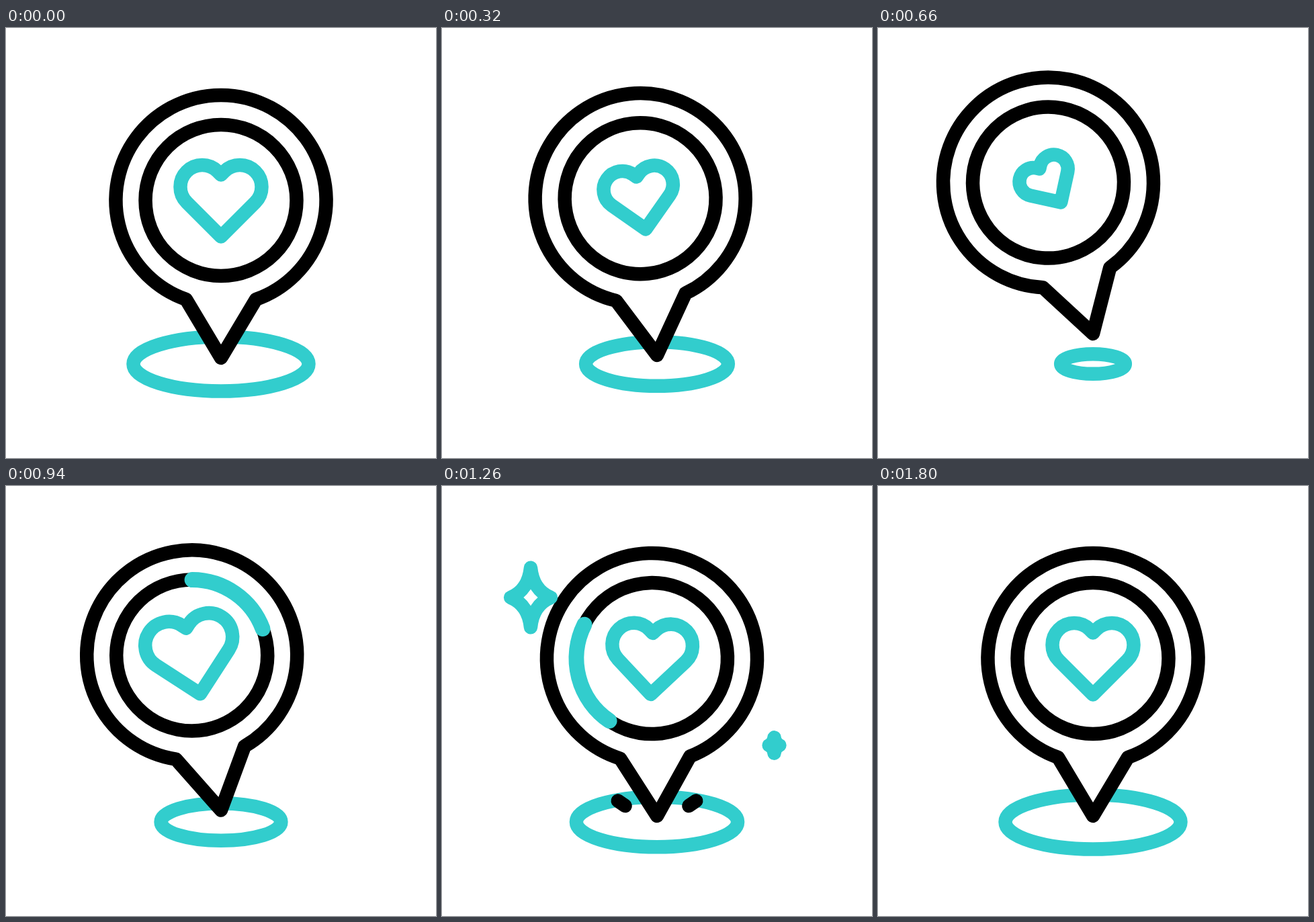
These frames come from a looping animation (640 px wide and 640 px high, 3 s). An HTML page with a canvas:

```html
<!DOCTYPE html>
<html lang="en">
<head>
<meta charset="utf-8">
<title>Map pin with heart</title>
<style>
  html, body { margin: 0; height: 100%; overflow: hidden; background: #fff; }
  canvas { display: block; }
</style>
</head>
<body>
<canvas id="stage" width="640" height="640"></canvas>
<script>
const ctx = document.getElementById('stage').getContext('2d');
const LOOP = 3000, LINE = 20.5, BLACK = '#000', TEAL = '#32cdcd';
const PIN_HEIGHT = 234.5; // from tip to centre of the head
const rad = degrees => degrees * Math.PI / 180;
const progress = (t, from, to) => Math.min(1, Math.max(0, (t - from) / (to - from)));
const smooth = u => u * u * (3 - 2 * u);

// Eased value at time t through [time, value] keys.
function track(t, keys) {
  let value = keys[0][1];
  for (let i = 1; i < keys.length; i++) {
    const u = smooth(progress(t, keys[i - 1][0], keys[i][0]));
    value += (keys[i][1] - keys[i - 1][1]) * u;
  }
  return value;
}

function stroke(path, color, width = LINE) {
  ctx.strokeStyle = color;
  ctx.lineWidth = width;
  ctx.stroke(path);
}

const pinBody = new Path2D('M0 0L-52-87A156.5 156.5 0 1 1 52-87Z');
const heart = new Path2D('M0-38L-5-43A32.5 32.5 0 0 0-51 3L0 54L51 3A32.5 32.5 0 0 0 5-43Z');
const star = new Path2D(
  'M0-52.5C2.5-28 14.5-8.5 35.5 0C14.5 8.5 2.5 28 0 52.5' +
  'C-2.5 28-14.5 8.5-35.5 0C-14.5-8.5-2.5-28 0-52.5Z');
const innerRing = new Path2D();
innerRing.arc(0, 0, 112.5, 0, 2 * Math.PI);

// Scales the outline but keeps the line width.
function strokeTransformed(path, color, matrix) {
  const scaled = new Path2D();
  scaled.addPath(path, matrix);
  stroke(scaled, color);
}

function drawShadow(t) {
  const size = 1 - track(t, [[100, 0], [720, .65], [840, .65], [1062, -.125], [1260, .08], [1500, 0]]);
  const ring = new Path2D();
  ring.ellipse(320, 500, 130.5 * size, 40.5 * size, 0, 0, 2 * Math.PI);
  stroke(ring, TEAL);
}

function drawRays(t) {
  const head = smooth(progress(t, 1150, 1350));
  const tail = smooth(progress(t, 1187, 1387));
  if (head <= tail) return;
  for (const side of [-1, 1]) {
    const ray = new Path2D();
    for (const p of [tail, head]) ray.lineTo(320 + side * (35 + 40 * p), 484.6 - 27.6 * p);
    stroke(ray, BLACK);
  }
}

function drawSweep(t) {
  const trim = (from, to) => 1 - (1 - progress(t, from, to)) ** 1.35;
  const head = trim(847, 1422), tail = trim(930, 1612);
  if (head <= tail) return;
  const arc = new Path2D();
  arc.arc(0, 0, 112.5, rad(-87 + 360 * tail), rad(-87 + 360 * head));
  stroke(arc, TEAL, 23);
}

function drawPin(t) {
  const lift = t < 670 ? 37.5 * (t / 670) ** 3 : track(t, [[840, 37.5], [986, 0]]);
  const tilt = track(t, [[0, 0], [840, -18.65], [1091, 3.9], [1280, -2], [1650, 0]]);
  const heartTurn = track(t, [[110, 0], [840, -19], [1003, 7], [1540, 0]]);
  const heartSize = track(t, [[0, 1], [780, .62], [960, 1.1], [1200, .985], [1400, 1]]);

  ctx.save();
  ctx.translate(320, 491 - lift);
  ctx.rotate(rad(tilt));
  ctx.fillStyle = '#fff';
  ctx.fill(pinBody);
  stroke(pinBody, BLACK);
  ctx.translate(0, -PIN_HEIGHT);
  stroke(innerRing, BLACK);
  drawSweep(t);
  strokeTransformed(heart, TEAL, new DOMMatrix().rotate(heartTurn).scale(heartSize));
  ctx.restore();
}

function drawSparkle(t, x, y, start) {
  const size = track(t - start, [[0, 0], [302, 1], [405, 1], [585, 0]]);
  if (size > .001) strokeTransformed(star, TEAL, new DOMMatrix().translate(x, y).scale(size));
}

function draw(now) {
  const t = now % LOOP;
  ctx.fillStyle = '#fff';
  ctx.fillRect(0, 0, 640, 640);
  ctx.lineCap = ctx.lineJoin = 'round';
  drawShadow(t);
  drawRays(t);
  drawPin(t);
  drawSparkle(t, 132, 166, 1035);
  drawSparkle(t, 494.5, 386, 1169);
}

const begin = performance.now();
function frame() {
  draw(performance.now() - begin);
  requestAnimationFrame(frame);
}
frame();
</script>
</body>
</html>
```
